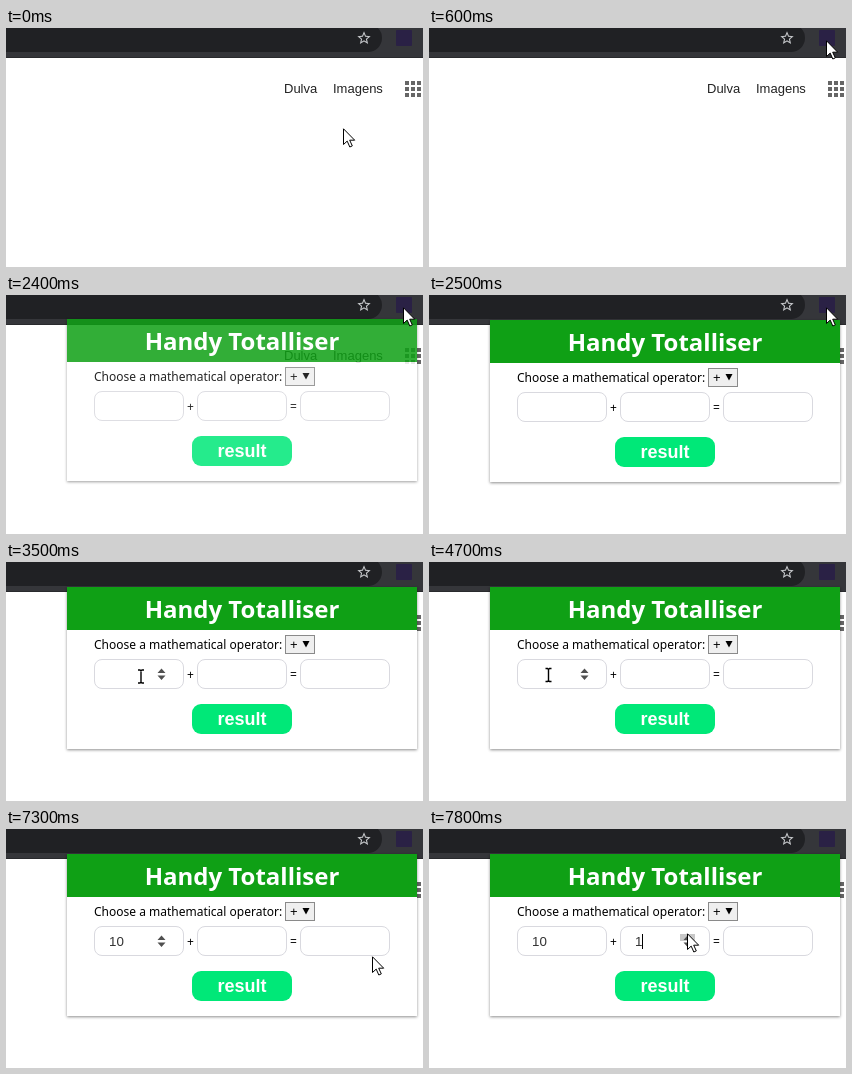
An HTML page for the animation above (8 s loop, 417 px wide and 239 px high).

```html
<!DOCTYPE html>
<html lang="pt">
<head>
<meta charset="utf-8">
<title>Calculator popup</title>
<style>
  html, body { margin: 0; width: 100%; height: 100%; overflow: hidden; background: #fff; }
  svg { display: block; width: 417px; height: 239px; }
  text { white-space: pre; }
  .ui { font: 13px "Liberation Sans", Arial, sans-serif; fill: #222; }
  .field { font: 13.33px "Liberation Sans", Arial, sans-serif; fill: #333; }
  .label { font: 12px "Noto Sans", "Open Sans", sans-serif; fill: #000; }
  .title { font: 700 24px "Noto Sans", "Open Sans", sans-serif; fill: #fff; }
  .button { font: 700 18px "Liberation Sans", Arial, sans-serif; fill: #fff; }
  #card { filter: drop-shadow(0 1px 1.5px rgba(0, 0, 0, .45)); }
</style>
</head>
<body>
<svg viewBox="0 0 417 239">
  <defs>
    <rect id="box" x=".5" y="97.5" width="89" height="29" rx="7.5" fill="#fff" stroke="#d9d9df"/>
    <path id="arrows" d="M63.5 111l4-4.5 4 4.5zM63.5 113.5l4 4.5 4-4.5z" fill="#505050"/>
  </defs>

  <!-- browser bar -->
  <rect width="417" height="30" fill="#35363a"/>
  <rect y="29" width="417" height="1" fill="#292a2d"/>
  <rect x="-20" y="-4" width="396" height="28" rx="14" fill="#202124"/>
  <path transform="translate(350 2) scale(.667)" fill="#c6c8cb" d="M22 9.24l-7.19-.62L12 2 9.19 8.63 2 9.24l5.46 4.73L5.82 21 12 17.27 18.18 21l-1.63-7.03zM12 15.4l-3.76 2.27 1-4.28-3.32-2.88 4.38-.38L12 6.1l1.71 4.04 4.38.38-3.32 2.88 1 4.28z"/>
  <rect x="390" y="2" width="16" height="16" rx="1" fill="#2a2145"/>

  <!-- page -->
  <text class="ui" x="278" y="65">Dulva</text>
  <text class="ui" x="327" y="65" id="link">Imagens</text>
  <path d="M399 55h16M399 61h16M399 67h16" stroke="#666" stroke-width="4" stroke-dasharray="4 2"/>

  <g id="popup">
    <rect id="card" x="61" y="25" width="350" height="162" fill="#fff"/>
    <rect x="61" y="25" width="350" height="43" fill="#0fa015"/>
    <text class="title" x="236" y="56" text-anchor="middle">Handy Totalliser</text>
    <text class="label" x="88" y="87">Choose a mathematical operator:</text>
    <rect x="279.5" y="73.5" width="29" height="18" fill="#efefef" stroke="#8a8a8a"/>
    <text class="ui" x="284" y="87" style="fill:#000">+</text>
    <path d="M296.5 79h7l-3.5 6.5z"/>
    <use href="#box" x="88"/>
    <use href="#box" x="191"/>
    <use href="#box" x="294"/>
    <text class="label" x="181" y="117">+</text>
    <text class="label" x="284" y="117">=</text>
    <rect id="hover" x="251" y="105" width="15" height="7" fill="#c8c8c8"/>
    <use id="spin1" href="#arrows" x="88"/>
    <use id="spin2" href="#arrows" x="191"/>
    <text class="field" id="first" x="103" y="117"></text>
    <text class="field" id="second" x="206" y="117"></text>
    <rect id="caret" y="105" width="1" height="15"/>
    <rect x="186" y="142" width="100" height="30" rx="9" fill="#00e878"/>
    <text class="button" x="236" y="163" text-anchor="middle">result</text>
  </g>

  <path id="arrow" d="M.5 .8V16.5L4.2 13.1 6.8 19 9.3 17.9 6.7 12.2H11.7Z" fill="#fff" stroke="#000" stroke-linejoin="round"/>
  <g id="beam" fill="none">
    <path d="M-3-6.5H3M0-6.5V6.5M-3 6.5H3" stroke="#fff" stroke-width="3.4"/>
    <path d="M-3-6.5H-1L0-5.5 1-6.5H3M0-6V6M-3 6.5H-1L0 5.5 1 6.5H3" stroke="#000" stroke-width="1.4"/>
  </g>
</svg>
<script>
const LOOP = 8000;
const $ = id => document.getElementById(id);
const show = (id, on) => $(id).setAttribute("visibility", on ? "visible" : "hidden");
const move = (id, x, y) => $(id).setAttribute("transform", `translate(${x} ${y})`);
const ease = p => p * p * (3 - 2 * p);

// [start time, ...values]; each holds until the next
const pointer = [
  [2300, "arrow", 397, 12],
  [3500, "beam", 135, 114.5],
  [3800, "beam", 119.5, 113],
  [6500, "beam", 202.5, 108],
  [6700, "beam", 217, 107.5],
  [6900, "beam", 227, 107.5],
  [7300, "arrow", 366, 127],
  [7800, "arrow", 258, 104]
];
const carets = [[0, 0], [4100, 103], [4700, 0], [5100, 110], [5400, 118], [7300, 0], [7800, 213]];
const at = (list, t) => list.filter(k => k[0] <= t).pop();

function pointerAt(t) {
  if (t >= 2300) return at(pointer, t).slice(1);
  const step = Math.min(6, Math.floor(t / 100));
  const p = ease(step / 6);
  return ["arrow", 337 + 60 * p, 100 - 88 * p];
}

function draw(t) {
  const [kind, x, y] = pointerAt(t);
  show("arrow", kind === "arrow");
  show("beam", kind === "beam");
  move(kind, x, y);
  const onLink = x > 327 && x < 377 && y > 52 && y < 68;
  $("link").style.textDecoration = onLink ? "underline" : "none";

  const stage = Math.floor((t - 2300) / 100);
  $("popup").setAttribute("opacity", stage < 0 ? 0 : [.42, .85][stage] ?? 1);
  move("popup", 0, Math.min(0, stage - 2));

  const caret = at(carets, t)[1];
  show("caret", caret > 0);
  $("caret").setAttribute("x", caret);
  $("first").textContent = t < 5100 ? "" : t < 5400 ? "1" : "10";
  $("second").textContent = t < 7800 ? "" : "1";
  show("spin1", t >= 3500 && t < 7800);
  show("spin2", t >= 6700 && t < 7300 || t >= 7800);
  show("hover", t >= 7800);
}

function frame() {
  draw(performance.now() % LOOP);
  requestAnimationFrame(frame);
}
frame();
</script>
</body>
</html>
```
